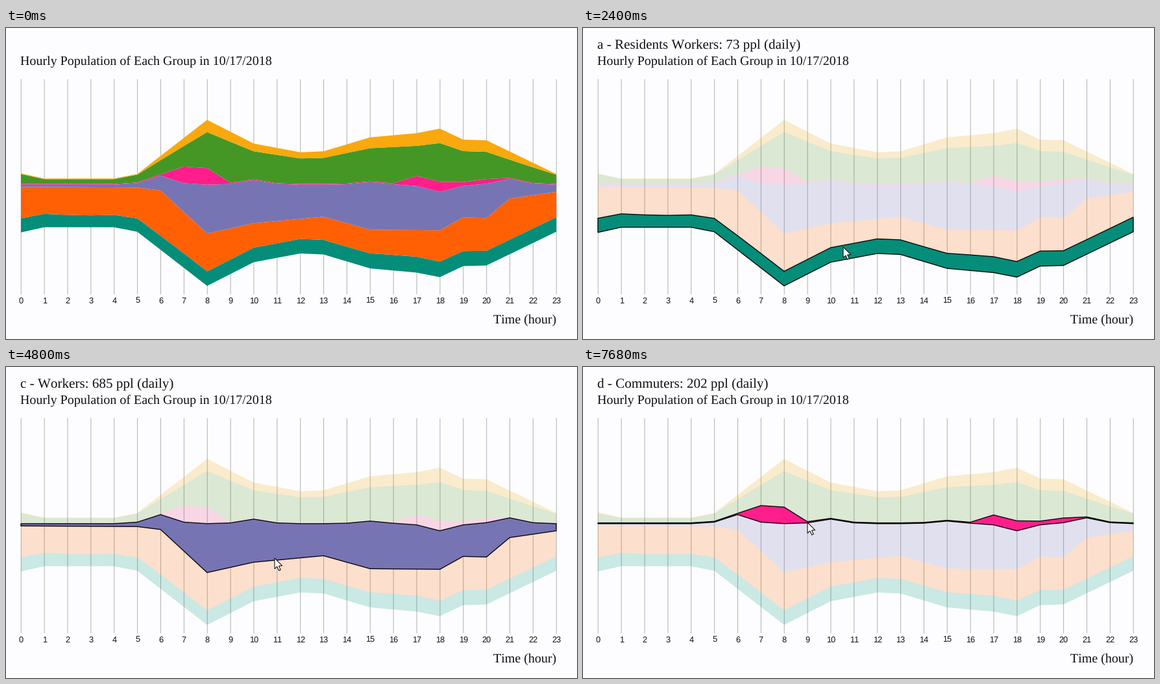
Write a matplotlib script that moves like this. It is 880x480 px and loops after 8 s.

```python
import numpy as np
import matplotlib.pyplot as plt
from matplotlib.animation import FuncAnimation
from matplotlib.colors import to_rgb
from matplotlib.patches import Polygon

W, H, DPI = 880, 480, 100
LOOP, INTERVAL, STEP = 8000, 40, 120
BG = "#fdfdff"
PX = 72 / DPI
FADED, FADE_MS = 0.2, 250

plt.rcParams["text.kerning_factor"] = 6
plt.rcParams["text.hinting"] = "none"

hours = np.arange(24)
xs = 23 + hours * 825 / 23


def bump(center, height, width=0.75):
    return height * np.exp(-((hours - center) / width) ** 2)


def through(*points):
    """Straight segments through (hour, y) points, sampled hourly."""
    return np.interp(hours, *zip(*points))


def band_edges():
    """Band boundaries from the bottom up, mirrored about the chart's middle."""
    top = through((0, 224), (1, 232), (4, 232), (5, 225), (8, 141.5), (10, 178),
                  (12, 191.5), (13, 190), (15, 168.5), (17, 162), (18, 155),
                  (19, 172), (20, 173), (23, 225))
    bottom = 539.2 - top
    visitors = 1 + np.clip(bottom - top - 88, 0, None) * (0.07 + 0.0045 * hours)
    commuters = 1.2 + bump(7.5, 38) + bump(17.5, 22) + bump(19.6, 8)
    workers_top = 241.5 + (bump(6, -14) + bump(10, -7) + bump(15, -4)
                           + bump(18, 11) + bump(21, -9))
    residents_top = through((0, 245), (5, 246), (6, 250.5), (8, 317), (10, 301),
                            (13, 291), (15, 311), (18, 312), (19, 292),
                            (20, 293), (21, 263), (23, 252.5))
    both = 22.5 + bump(3, -4.2, 2.2) + bump(17, 2, 2)
    edges = [bottom, bottom - both, residents_top, workers_top,
             workers_top - commuters, top + visitors, top]
    return [edge + 0.3 for edge in edges]


# (full colour, colour when faded) from the bottom band up
COLORS = [("#048d79", "#009478"), ("#ff6004", "#f86900"), ("#7774b4", "#7570b3"),
          ("#ff1e8b", "#e43a82"), ("#449725", "#549423"), ("#f9a80d", "#e9a300")]
COLORS = [tuple(np.array(to_rgb(c)) for c in pair) for pair in COLORS]
TITLES = ["a - Residents Workers: 73 ppl (daily)",
          "b - Residents: 373 ppl (daily)",
          "c - Workers: 685 ppl (daily)",
          "d - Commuters: 202 ppl (daily)"]

# Times in ms at which the pointer enters bands a, b, c and d
HOVER_TIMES = [350, 2405, 4280, 7170]

# (time in ms, x, y) of the pointer tip
PATH = np.array([(120, 418, 466), (480, 401, 346), (600, 401, 343), (2400, 401, 338),
                 (3600, 401, 321), (4080, 401, 321), (4680, 414, 295),
                 (4920, 414, 295), (6960, 346, 240)])
ARROW = np.array([(0, 0), (0, 16.5), (3.8, 13), (6.6, 19.2), (9.2, 18),
                  (6.5, 12), (11.7, 11.8)])

fig = plt.figure(figsize=(W / DPI, H / DPI), dpi=DPI, facecolor=BG)
ax = fig.add_axes([0, 0, 1, 1])
ax.set(xlim=(0, W), ylim=(H, 0))
ax.axis("off")


def label(x, y, text, size, family="Liberation Serif", ha="left"):
    return ax.text(x, y, text, fontsize=size * PX, family=family, ha=ha,
                   va="baseline", color="#101010", zorder=5)


for hour, x in zip(hours, xs):
    ax.plot([x + 0.25] * 2, [79, 411], color="#acb2ad", lw=PX, zorder=1,
            snap=False, solid_capstyle="butt")
    label(x + 0.3, 425, str(hour), 12.7, "Liberation Sans", "center")

label(22.5, 57, "Hourly Population of Each Group in 10/17/2018", 20)
label(848, 457, "Time (hour)", 20, ha="right")
title = label(22.5, 32, "", 21.15)

edges = band_edges()
bands = []
for lower, upper in zip(edges, edges[1:]):
    outline = np.r_[np.c_[xs, upper], np.c_[xs, lower][::-1]]
    bands.append(ax.add_patch(Polygon(outline, ec="none", lw=0, zorder=2)))

border = ax.add_patch(Polygon(bands[0].get_xy(), fc="none", ec="#080808",
                              lw=1.4 * PX, joinstyle="miter", zorder=3))
pointer = ax.add_patch(Polygon(ARROW, fc="white", ec="black", lw=PX,
                               joinstyle="miter", zorder=6))


def ease(p):
    p = min(max(p, 0), 1)
    return 4 * p ** 3 if p < 0.5 else 1 - 4 * (1 - p) ** 3


def fade_levels(hovered):
    return np.array([float(hovered >= 0 and i != hovered) for i in range(len(bands))])


def update(frame):
    t = frame * INTERVAL // STEP * STEP
    current = sum(t >= start for start in HOVER_TIMES) - 1
    hovering = current >= 0

    p = ease((t - HOVER_TIMES[current]) / FADE_MS) if hovering else 1
    levels = fade_levels(current - 1) * (1 - p) + fade_levels(current) * p
    for band, (full, pale), level in zip(bands, COLORS, levels):
        band.set_facecolor(full + (pale - full) * level)
        band.set_alpha(1 - (1 - FADED) * level)

    border.set_visible(hovering)
    title.set_text(TITLES[current] if hovering else "")
    if hovering:
        border.set_xy(bands[current].get_xy())

    tip = [np.interp(t, PATH[:, 0], PATH[:, k]) for k in (1, 2)]
    pointer.set_visible(bool(t >= PATH[0, 0]))
    pointer.set_xy(ARROW + np.round(tip))
    return [*bands, border, title, pointer]


anim = FuncAnimation(fig, update, frames=LOOP // INTERVAL, interval=INTERVAL,
                     repeat=True, repeat_delay=0, blit=False)
plt.show()
```
